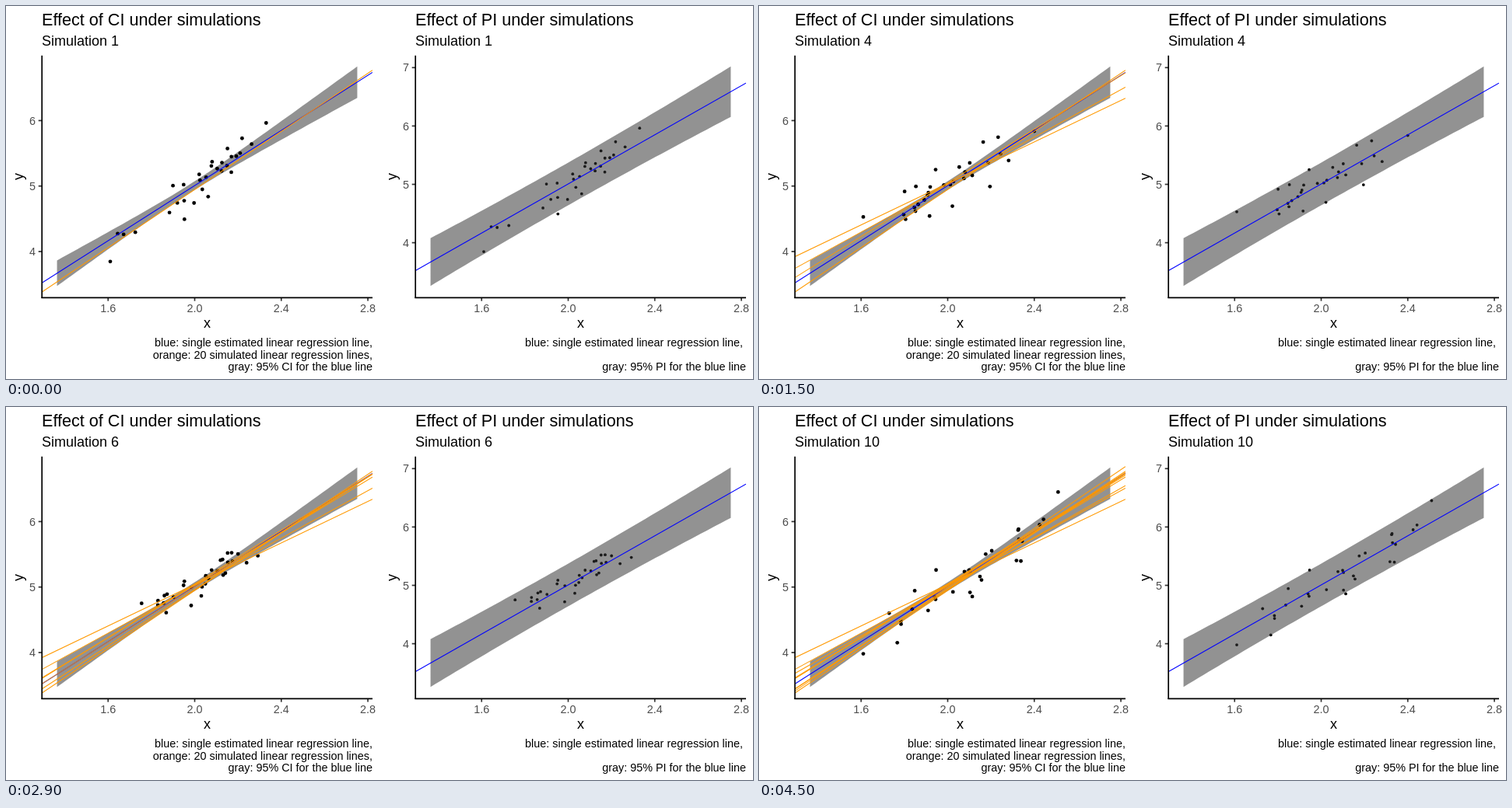
Recreate the animation shown at these times as an HTML page with a canvas. Size 960 by 480 pixels, loop 4.9 s.

```html
<!DOCTYPE html>
<html lang="en">
<head>
<meta charset="utf-8">
<title>Effect of CI and PI under simulations</title>
<style>
  html, body { margin: 0; width: 100%; height: 100%; overflow: hidden; background: #fff; }
  canvas { display: block; }
</style>
</head>
<body>
<canvas id="stage" width="960" height="480"></canvas>
<script>
const ctx = document.getElementById('stage').getContext('2d');
const LOOP = 4900, STEP = 100, POINTS = 30;
const X_MIN = 1.293, X_MAX = 2.821;
const LOWEST = 1.61, CENTRE = 2.02, NOISE = 0.17;

const mix = (a, b, k) => a + (b - a) * k;
const toX = x => 242.5 + (x - 2) * 278.2;
const lineAt = ({ left, right }, x) => mix(left, right, (x - X_MIN) / (X_MAX - X_MIN));
const estimate = { left: 3.519, right: 6.735 };

// Squared half width of the confidence band; the prediction band adds a constant.
const variance = x => 0.0044 + 0.0893 * (x - 1.98) ** 2;

const ciPanel = {
  offset: 0, name: 'CI', ticks: [4, 5, 6], extra: 0, radius: 2.4,
  toY: y => 231.7 - (y - 5) * 84.25,
  caption: ['blue: single estimated linear regression line,',
    'orange: 20 simulated linear regression lines,', 'gray: 95% CI for the blue line']
};
const piPanel = {
  offset: 480, name: 'PI', ticks: [4, 5, 6, 7], extra: 0.129, radius: 1.9,
  toY: y => 229.5 - (y - 5) * 75.1,
  caption: ['blue: single estimated linear regression line, ', '', 'gray: 95% PI for the blue line']
};

function makeRandom(seed) {
  const next = () => {
    seed = (seed + 0x6D2B79F5) | 0;
    let t = Math.imul(seed ^ (seed >>> 15), 1 | seed);
    t ^= t + Math.imul(t ^ (t >>> 7), 61 | t);
    return ((t ^ (t >>> 14)) >>> 0) / 4294967296;
  };
  return () => Math.sqrt(-2 * Math.log(1 - next())) * Math.cos(2 * Math.PI * next());
}

// A normal cloud around a line, scaled to reach from LOWEST to the given x.
function makeCloud(seed, line, reach) {
  const normal = makeRandom(seed);
  const draws = Array.from({ length: POINTS }, normal);
  const low = Math.min(...draws), high = Math.max(...draws);
  return draws.map(d => {
    const x = CENTRE + (d < 0 ? (LOWEST - CENTRE) * d / low : (reach - CENTRE) * d / high);
    return { x, y: lineAt(line, x) + NOISE * normal() };
  });
}

// Line height at the left and right edge, and the x of the farthest point.
const sims = [
  [3.38, 6.77, 2.33], [3.60, 6.73, 2.36], [3.74, 6.51, 2.45], [3.92, 6.34, 2.4], [3.61, 6.68, 2.68],
  [3.44, 6.73, 2.45], [3.60, 6.71, 2.4], [3.68, 6.55, 2.4], [3.44, 6.75, 2.45], [3.41, 6.84, 2.51]
].map(([left, right, reach], i) => {
  const line = { left, right };
  return { line, cloud: makeCloud(i + 1, line, reach) };
});

// The first change takes two steps, every later one a single step.
function stateAt(time) {
  const step = Math.floor((time % LOOP) / STEP);
  if (step < 5) return { index: 0, k: Math.max(0, step - 2) / 3 };
  return { index: Math.floor(step / 5), k: step % 5 === 4 ? 0.5 : 0 };
}

function text(str, x, y, size, align = 'left', color = '#000') {
  ctx.font = `${size}px "Liberation Sans", Arial, sans-serif`;
  ctx.textAlign = align;
  ctx.fillStyle = color;
  ctx.fillText(str, x, y);
}

function stroke(x1, y1, x2, y2, color, width) {
  ctx.strokeStyle = color;
  ctx.lineWidth = width;
  ctx.beginPath();
  ctx.moveTo(x1, y1);
  ctx.lineTo(x2, y2);
  ctx.stroke();
}

function drawBand({ toY, extra }) {
  const from = 1.364, to = 2.751, parts = 60;
  ctx.beginPath();
  for (const side of [1, -1]) {
    for (let i = 0; i <= parts; i++) {
      const x = mix(from, to, side > 0 ? i / parts : 1 - i / parts);
      ctx.lineTo(toX(x), toY(lineAt(estimate, x) + side * Math.sqrt(variance(x) + extra)));
    }
  }
  ctx.fillStyle = 'rgba(51,51,51,0.535)';
  ctx.fill();
}

function drawPoints({ toY, radius }, cloud) {
  ctx.fillStyle = '#000';
  for (const { x, y } of cloud) {
    ctx.beginPath();
    ctx.arc(toX(x), toY(y), radius, 0, 2 * Math.PI);
    ctx.fill();
  }
}

function drawLine({ toY }, { left, right }, color) {
  stroke(toX(X_MIN), toY(left), toX(X_MAX), toY(right), color, 1.07);
}

function drawAxes({ toY, ticks }) {
  for (const x of [1.6, 2, 2.4, 2.8]) {
    stroke(toX(x), 375.3, toX(x), 379.6, '#333', 1.7);
    text(x.toFixed(1), toX(x), 394, 14.4, 'center', '#4d4d4d');
  }
  for (const y of ticks) {
    stroke(41.7, toY(y), 46.2, toY(y), '#333', 1.7);
    text(y, 38, toY(y) + 5.1, 14.4, 'right', '#4d4d4d');
  }
  stroke(46.2, 63.8, 46.2, 376.1, '#000', 1.7);
  stroke(45.4, 375.3, 471, 375.3, '#000', 1.7);
}

function drawLabels({ name, caption }, number) {
  text(`Effect of ${name} under simulations`, 46, 25, 21.6);
  text(`Simulation ${number}`, 46, 51, 18);
  text('x', 258.5, 414, 18, 'center');
  ctx.save();
  ctx.translate(21.5, 219.5);
  ctx.rotate(-Math.PI / 2);
  text('y', 0, 0, 18, 'center');
  ctx.restore();
  caption.forEach((row, i) => {
    const space = row.length - row.trimEnd().length;
    text(row.trimEnd(), 471 - 4 * space, 437.6 + 15.9 * i, 14.4, 'right');
  });
}

function drawPanel(panel, cloud, lines, number) {
  ctx.save();
  ctx.translate(panel.offset, 0);
  ctx.save();
  ctx.beginPath();
  ctx.rect(46.2, 63.8, 424.8, 311.5);
  ctx.clip();
  const layers = [() => drawBand(panel), () => drawPoints(panel, cloud)];
  if (panel === piPanel) layers.reverse();
  layers.forEach(draw => draw());
  drawLine(panel, estimate, '#00f');
  for (const line of lines) drawLine(panel, line, '#ff9900');
  ctx.restore();
  drawAxes(panel);
  drawLabels(panel, number);
  ctx.restore();
}

function render(time) {
  const { index, k } = stateAt(time);
  const now = sims[index], next = sims[Math.min(index + 1, sims.length - 1)];
  const cloud = now.cloud.map((p, i) => ({
    x: mix(p.x, next.cloud[i].x, k),
    y: mix(p.y, next.cloud[i].y, k)
  }));
  const lines = sims.slice(0, index + 1).map(sim => sim.line);
  if (k > 0) {
    lines.push({
      left: mix(now.line.left, next.line.left, k),
      right: mix(now.line.right, next.line.right, k)
    });
  }
  const number = index + (k > 0.5 ? 2 : 1);

  ctx.fillStyle = '#fff';
  ctx.fillRect(0, 0, 960, 480);
  drawPanel(ciPanel, cloud, lines, number);
  drawPanel(piPanel, cloud, [], number);
}

const start = performance.now();
function tick() {
  render(performance.now() - start);
  requestAnimationFrame(tick);
}
tick();
</script>
</body>
</html>
```
